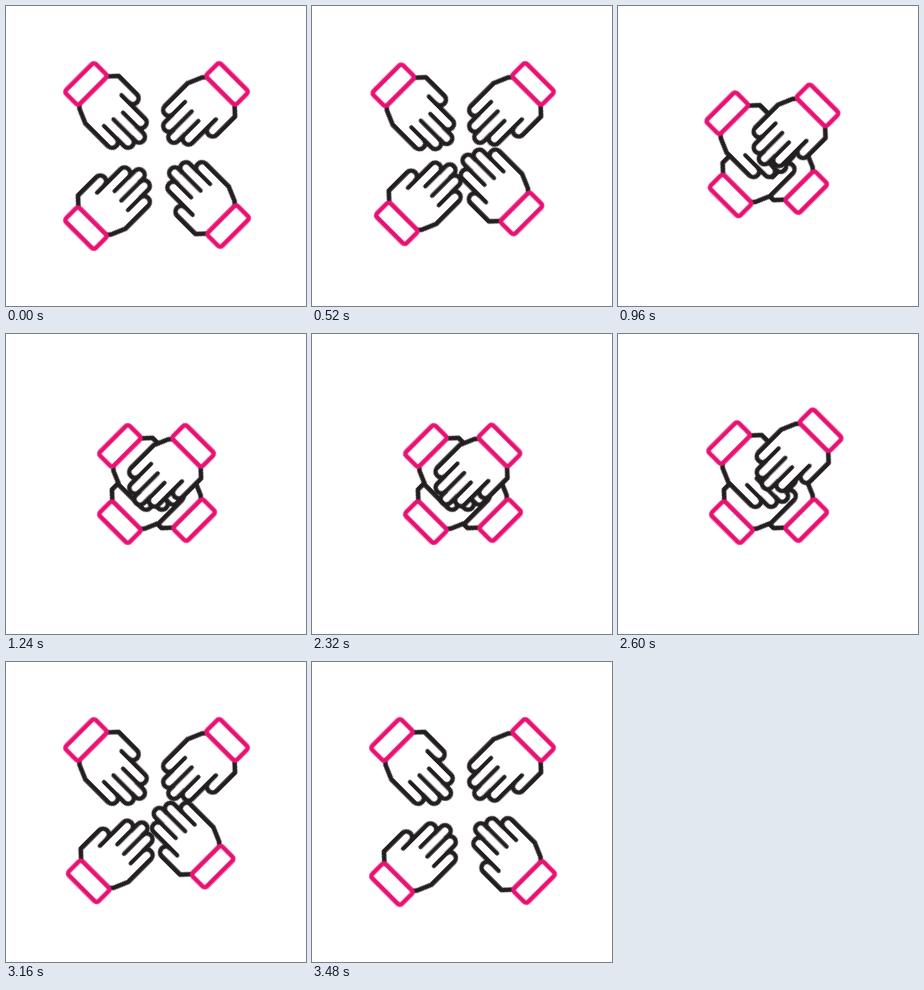
Write an HTML page that moves like this. It is 300 px wide and 300 px high and loops after 3.52 s.

```html
<!DOCTYPE html>
<html lang="en">
<head>
<meta charset="utf-8">
<title>Hands together</title>
<style>
  html, body { margin: 0; width: 100%; height: 100%; overflow: hidden; background: #fff; }
  svg { display: block; width: 100%; height: 100%; }
  path, rect { stroke-width: 4.6; stroke-linecap: round; stroke-linejoin: round; }
  .skin { fill: #fff; stroke: #231f20; }
  .crease { fill: none; stroke: #231f20; stroke-width: 4.2; }
  .cuff { fill: #fff; stroke: #e81272; }
</style>
</head>
<body>
<svg id="stage" viewBox="0 0 300 300">
  <defs>
    <!-- Origin at the cuff centre, fingers along +x, thumb towards -y -->
    <g id="hand">
      <path class="skin" d="M9 19 L13 22.4 L27 28.4 H59.2
        A5.7 5.7 0 0 0 59.2 17 H70.5
        A5.7 5.7 0 0 0 70.5 5.6 H74.7
        A5.7 5.7 0 0 0 74.7 -5.8 H65.7
        A5.7 5.7 0 0 0 65.7 -17.2 H43
        A5.7 5.7 0 0 0 43 -28.6 H17 L9 -20"/>
      <path class="crease" d="M59.2 17 H42 M70.5 5.6 H44 M65.7 -5.8 H46 M43 -17.2 H32.5"/>
      <rect class="cuff" x="-10.2" y="-21" width="19.6" height="42" rx="3"/>
    </g>
  </defs>
</svg>
<script>
  const LOOP = 3520, MOVE = 680, REACH = 48;
  const EASE = 'cubic-bezier(.333, 0, .667, 1)';

  // Back to front: home position, direction, start of the way in and out
  const hands = [
    { x: 221.8, y: 219.8, turn: 225, go: 240, back: 2800 },
    { x: 80.2, y: 221.8, turn: 315, go: 360, back: 2600 },
    { x: 80.3, y: 78.2, turn: 45, go: 440, back: 2480 },
    { x: 220.8, y: 78.2, turn: 135, go: 560, back: 2280 }
  ];

  const stage = document.getElementById('stage');

  function add(tag, parent, attrs) {
    const el = document.createElementNS('http://www.w3.org/2000/svg', tag);
    for (const name in attrs) el.setAttribute(name, attrs[name]);
    return parent.appendChild(el);
  }

  const key = (time, reach, easing = 'linear') => ({
    offset: time / LOOP,
    transform: `translateX(${reach}px)`,
    easing
  });

  for (const { x, y, turn, go, back } of hands) {
    const home = add('g', stage, { transform: `translate(${x} ${y}) rotate(${turn})` });
    const slider = add('g', home, {});
    add('use', slider, { href: '#hand' });
    slider.animate([
      key(0, 0),
      key(go, 0, EASE),
      key(go + MOVE, REACH),
      key(back, REACH, EASE),
      key(back + MOVE, 0),
      key(LOOP, 0)
    ], { duration: LOOP, iterations: Infinity });
  }
</script>
</body>
</html>
```
